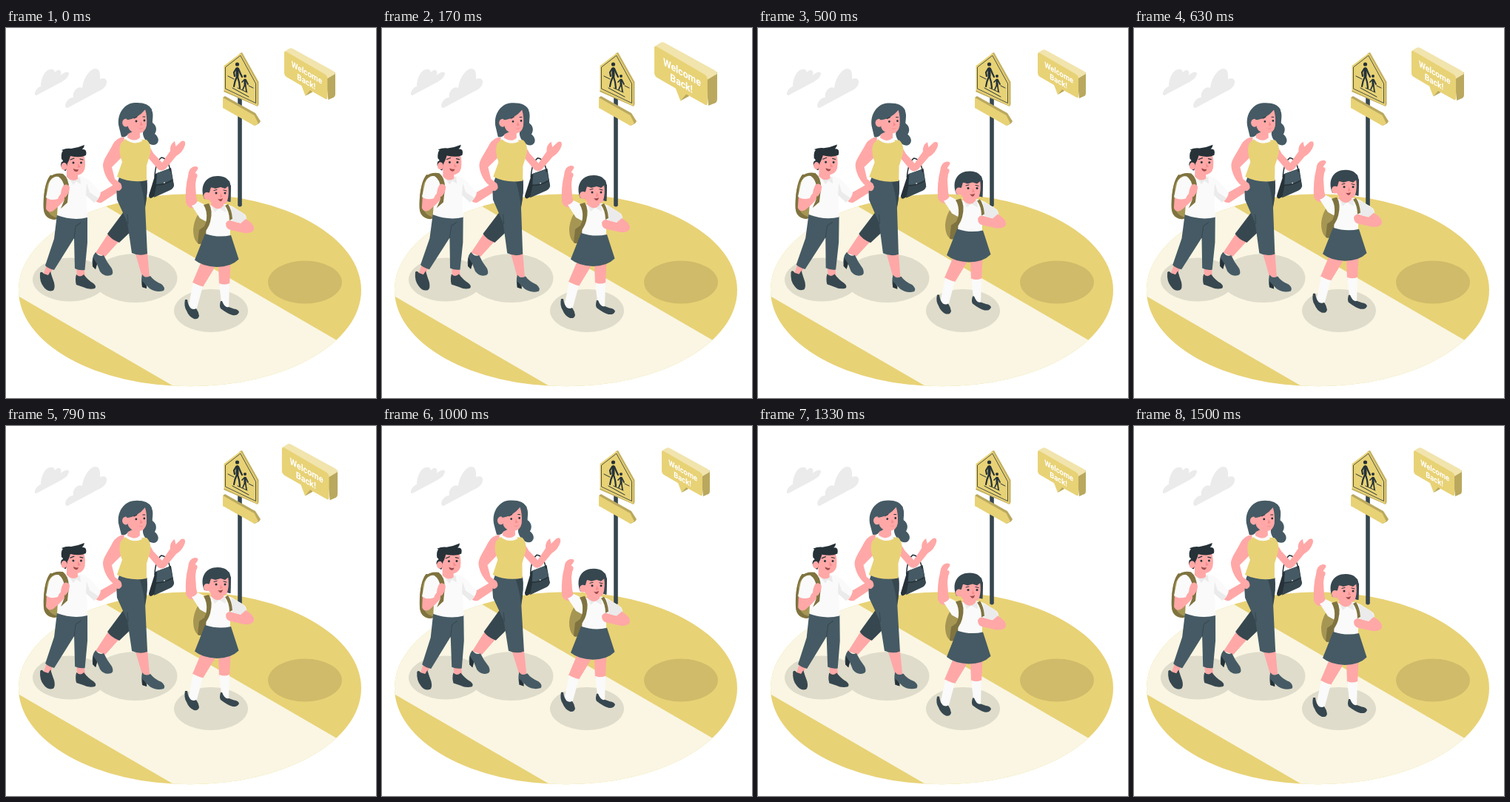
An HTML page that plays this animation: 500x500 px, repeating every 1540 ms.

```html
<!DOCTYPE html>
<html lang="en">
<head>
<meta charset="utf-8">
<title>Welcome back</title>
<style>
html, body { margin: 0; width: 100%; height: 100%; overflow: hidden; background: #fff; }
svg { display: block; width: 100%; height: 100%; }
.skin { fill: #ffa8a7; }
.blush { fill: #f58d8f; }
.white { fill: #fafafa; }
.fold { fill: #ebebeb; }
.slate { fill: #455a64; }
.dark { fill: #37474f; }
.ink { fill: #263238; }
.yellow { fill: #e8d276; }
.olive { fill: #7f7340; }
.tan { fill: #a59653; }
.line { fill: none; stroke: #263238; stroke-linecap: round; stroke-linejoin: round; }
.crease { fill: none; stroke: #37474f; stroke-linecap: round; }
text { font: 700 10.8px Roboto, sans-serif; fill: #fff; text-anchor: middle; }
</style>
</head>
<body>
<svg viewBox="0 0 500 500">
  <defs>
    <clipPath id="disc"><ellipse cx="248.5" cy="354.3" rx="231.5" ry="130"/></clipPath>
  </defs>

  <g id="clouds" fill="#ebebeb">
    <path d="M39 90C38 86 43 80 47 79C47 68 53 56 60 56Q65 55 66 60C71 54 76 57 74 64C79 59 85 58 85 62Q84 68 75 73L43 90Q40 92 39 90Z"/>
    <path d="M81 107C78 103 85 93 91 94C89 86 97 78 103 81C105 66 114 55 121 55Q128 55 127 69C134 66 137 70 136 75Q134 82 124 86L85 107Q82 109 81 107Z"/>
  </g>

  <g id="floor" clip-path="url(#disc)">
    <rect class="yellow" x="10" y="220" width="480" height="270"/>
    <path fill="#faf6e3" d="M135 241L447 422L400 500H254L17 362.500V241Z"/>
  </g>
  <g id="shadows" opacity=".1">
    <ellipse cx="86" cy="340" rx="50" ry="29.500"/>
    <ellipse cx="174.500" cy="338" rx="57" ry="33"/>
    <ellipse cx="277" cy="382" rx="50" ry="29"/>
    <ellipse cx="404" cy="343.500" rx="50" ry="29"/>
  </g>

  <g id="sign">
    <path class="dark" d="M313.200 88H318.800V240Q316 243 313.200 240Z"/>
    <path fill="#c4b163" d="M316 34L319 33L341.500 73V103L340 106L294 86Z"/>
    <path class="yellow" d="M317 34L294.500 51V84L339.500 105V74Z"/>
    <path class="line" stroke-width=".8" d="M316.500 37.500L296.500 53V82L337.500 101.500V75.500Z"/>
    <path class="line" stroke-width="1" d="M300 65L308 69M328 78L334 81M306 81L328 93M313 81L326 87"/>
    <circle class="ink" cx="312.500" cy="49" r="2.600"/>
    <path class="line" stroke-width="4" d="M312.500 55V65"/>
    <path class="line" stroke-width="2.200" d="M312 66L309.500 72L308 79M313 66L315 73L316 81M311 55L308 60L309 65M314 55L317 62L319 66"/>
    <circle class="ink" cx="323" cy="65" r="2"/>
    <path class="line" stroke-width="3" d="M323 70V76"/>
    <path class="line" stroke-width="1.700" d="M323 76L320 83M323.500 76L325 86M322 70L319 73M324 70L327 76"/>
    <path fill="#baa85e" d="M293 94L296 92L337 115L344 126L342 129L336 132Z"/>
    <path class="yellow" d="M293 94L335.500 118L341 129L335.500 132L293 108Z"/>
  </g>

  <g id="bubble">
    <path fill="#b9a85e" d="M431 66L443 60V88Q443 91 441 92L434 95Z"/>
    <path fill="#f1e4ad" d="M379 33L384 30Q386 28.500 389 30L440 58Q443 60 443 62L433 68Z"/>
    <path fill="#b9a85e" d="M405 90L414 85L411 80Z"/>
    <path class="yellow" d="M381 34L429 62Q433 64 433 68V92Q433 96 429 93L411 83L405 90L400 77L381 66Q378 64 378 61V35Q378 32 381 34Z"/>
    <text transform="matrix(.866 .5 0 1 406.600 64)">Welcome</text>
    <text transform="matrix(.866 .5 0 1 406 75.500)">Back!</text>
  </g>

  <g id="walkers">
    <g id="boy">
      <path class="tan" d="M60 199C54 206 50 225 51 245Q52 258 65 259L74 256V205Z"/>
      <path class="olive" d="M60 199C53 207 50 226 51 246Q53 258 66 259L72 257Q58 255 56 244L55 215Q57 206 66 200Z"/>
      <path class="skin" d="M55 320L64 323L59 335L50 334ZM95 322H105.500L107 337L96 336Z"/>
      <path class="dark" d="M46 331Q48 328 51 332L57 334L60 329Q62 336 65 344Q67 353 63 355Q56 357 51 350Q45 343 46 331ZM95 333Q100 338 105 333Q111 341 118 345Q123 349 120 352Q112 354 104 350L95 347Q93 340 95 333Z"/>
      <path class="slate" d="M69 252L110 255L110 290L106.500 327Q99 328 93 325L92 284L65 327Q57 325 53 321L65 285Z"/>
      <path class="crease" d="M92 284L94 269M94 268L101 263"/>
      <path class="skin" d="M121 226L142 214Q152 207 156 214Q157 221 149 223L129 236Q122 237 119 231Z"/>
      <path class="white" d="M75 201L100 200Q109 202 115 208L128 223Q126 232 119 236L109 227L110 256Q91 261 69 253L71 224Z"/>
      <path class="fold" d="M109 210L108 226L119 236Q123 234 125 230L113 222Z"/>
      <path class="skin" d="M55 226L70 229L76 222Q74 213 80 212Q86 214 85 222Q82 232 64 247Q57 251 54 244Z"/>
      <path class="white" d="M73 202Q62 199 58 210L54 229Q60 234 70 231L77 214Z"/>
      <path class="olive" d="M58 202Q66 195 77 197Q85 203 85 217L83 236L74 244L79 232V216Q78 206 71 201Q65 200 58 204Z"/>
      <path class="skin" d="M79 212Q83 210 86 215Q86 223 80 229L74 224Q75 215 79 212Z"/>
      <path class="fold" d="M82 199L91 212L95 207L101 211L100 202Z"/>
      <path class="skin" d="M82 192V201Q89 209 97 204V194Z"/>
      <path class="skin" d="M80 174L105 171Q108 179 106.500 190Q104 199 94 199Q81 198 80 185Z"/>
      <path class="ink" d="M81 193Q77 193 78 189Q72 188 75 181Q79 180 75 177Q74 169 77 166L75 165Q82 162 88 163Q97 162 106 158Q106 161 103 164Q110 163 108 172Q101 176 87 173Q85 180 83 183Z"/>
      <ellipse class="skin" cx="78.500" cy="187" rx="4" ry="5"/>
      <circle class="ink" cx="91" cy="182" r="1.500"/><circle class="ink" cx="101.500" cy="182" r="1.500"/>
      <path class="line" stroke-width="1.200" d="M87 178L92 176M100 177L104 178"/>
      <path class="blush" d="M97 183L101 188L97 189Z"/>
      <path fill="#9e4b4b" d="M91 190Q95 192 98 191Q97 195 94 194Q91 193 91 190Z"/>
    </g>

    <g id="mother">
      <path class="skin" d="M138 278L153 288L134 309L121 304ZM174 302L191 303L194 337L184 336Z"/>
      <path class="slate" d="M121 303Q126 310 132 307Q136 316 143 325Q146 332 142 334Q133 337 127 329L123 319L121 326L117 322Q115 310 121 303ZM184 333Q188 339 195 335Q200 342 210 346Q216 351 213 355Q203 358 194 352L188 346L190 352L184 350Q182 341 184 333Z"/>
      <path class="ink" d="M118 311L123 319L121 326L117 322ZM184 342L190 348V352L184 350Z"/>
      <path class="dark" d="M160 247L137 278Q141 285 153 290L177 267V240Z"/>
      <path class="slate" d="M154 199L190 204Q192 220 188 240L191 305Q181 309 170 304L164 263L150 232Q148 213 154 199Z"/>
      <path class="dark" d="M181 208L190.500 205Q192 222 188 243Q186 222 181 208Z"/>
      <path class="crease" d="M165 264L164 252"/>
      <path class="slate" d="M188 104C202 109 198 120 198 128C204 132 204 139 201 143C206 147 208 153 203 157C196 161 186 152 185 143Z"/>
      <path class="ink" d="M202 197L223 189L227 213L196 230Q193 230 193 226Z"/>
      <path class="dark" d="M204 209L224 198L227 213Q226 217 222 219L200 229Z"/>
      <path class="slate" d="M204 196L222 190L225 204Q214 212 203 211Z"/>
      <path class="line" stroke-width="1.500" d="M201 201Q202 181 210 175Q219 176 222 193M203 212Q214 212 224 206"/>
      <circle cx="214" cy="209" r="1" fill="#ccc"/>
      <path class="skin" d="M190 157Q195 161 199 169L211 182L222 166Q221 157 228 153L229.500 160L237 153Q243 151 242 158Q239 168 230 173L216 190Q209 196 203 188L191 174Z"/>
      <path class="skin" d="M160 147Q149 148 144 158C138 170 131 178 131 186C132 198 139 208 144 212Q147 221 153 220Q159 217 155 210L147 204L143 188L157 174Z"/>
      <path class="yellow" d="M161 150L190 151Q198 158 194 173L190 186V206Q169 210 150 201L157 181Q151 166 155 156Z"/>
      <path class="white" d="M164 146L161 150Q172 159 184 153L182 146Z"/>
      <path class="skin" d="M165 137L164 148Q174 155 181 148V137Z"/>
      <path class="slate" d="M153 135C148 116 161 101 174 101Q192 100 197 110Q198 123 191 130L165 143Q163 148 156 147Z"/>
      <path class="skin" d="M165 124Q178 121 188 110Q191 119 190 132Q188 142 179 142Q168 142 165 134Z"/>
      <ellipse class="skin" cx="162" cy="128" rx="4.800" ry="5.500"/>
      <path class="slate" d="M163 124Q178 123 188 110Q178 106 168 112Z"/>
      <circle class="ink" cx="176" cy="126" r="1.400"/><circle class="ink" cx="187" cy="125" r="1.400"/>
      <path class="line" stroke-width="1" d="M173 122L177 120M185 120L188 120"/>
      <path class="blush" d="M182 126L185 131L181 132ZM178 134Q182 137 186 134Q183 139 178 134Z"/>
    </g>
  </g>

  <g id="girl">
    <path class="tan" d="M269 242Q255 252 253 272Q253 289 262 292L278 278Z"/>
    <path class="olive" d="M261 273L274 264L276 278L265 291Q262 293 259 291Z"/>
    <path class="skin" d="M263 318L283 322L266 350L252 344ZM287 318H303.500L302 348H288Z"/>
    <path class="white" d="M253 344Q259 349 266 349L257 382L246 378ZM288 345Q295 348 302 345L301 379H292Z"/>
    <path class="dark" d="M242 367Q240 376 244 382Q247 390 254 393Q260 394 261 389Q260 383 257 379Q254 381 250 379Q246 375 245 367ZM290 369Q288 376 290 379Q299 386 306 388Q313 389 315 384Q314 380 308 379.500L301 377Q296 379 292 369Z"/>
    <path class="skin" d="M243 236Q242 215 246 200Q247 188 255 187Q261 187 259 191L255.500 196Q261 197 257 204L256 212L257 228L260 242Q247 247 243 236Z"/>
    <path class="white" d="M251 240Q256 239 259 234L271 240L297 238Q305 240 309 243L323 252Q327 258 324 265L303 262L303 284L270 283L271 262L262 257Z"/>
    <path class="fold" d="M304 241L319 249Q328 257 324 265L306 261Z"/>
    <path class="skin" d="M324 258Q336 265 335 272Q333 278 322 277L304 273Q297 272 297 264Q300 258 306 261L317 264Z"/>
    <path class="slate" d="M269 278Q287 284 304 280L314.500 312.500Q304 323 285 323Q265 322 255 313.500Z"/>
    <path class="olive" d="M267 239L274 237Q280 246 276 262Q273 273 264 280L262 276Q270 268 271 258Q272 247 267 239ZM296 240L300 238Q305 245 306 258L302 260Q302 248 296 240Z"/>
    <path class="fold" d="M276 236L282 249L288 244L297 249L296 238Z"/>
    <path class="skin" d="M277 231V239Q286 249 294 240V233Z"/>
    <path class="dark" d="M268 231C261 213 270 200 286 200Q302 200 304 215L303 235L292 232Z"/>
    <path class="skin" d="M274 216L301 212Q303 227 299 235Q293 240 285 238Q275 237 273 229Z"/>
    <path class="dark" d="M270 225L275 222L277 215L283 217L290 215L296 217L301 213L304 216L302 207Q292 200 277 204Q266 211 270 225Z"/>
    <path class="dark" d="M300 212L304 213L303.500 235L299 234Q302 224 300 212Z"/>
    <ellipse class="skin" cx="271.500" cy="227" rx="4.500" ry="5"/>
    <circle class="ink" cx="284" cy="223" r="1.500"/><circle class="ink" cx="296" cy="223" r="1.500"/>
    <path class="line" stroke-width="1" d="M281 219.500L285 218.500M294 219L298 220"/>
    <path class="blush" d="M290 223L293 228L289 229Z"/>
    <path fill="#9e4b4b" d="M286 231Q290 232 293 230Q292 235 289 234Z"/>
  </g>
</svg>
<script>
const LOOP = 1540;
// [time, scale] of the double heartbeat
const BEAT = [[0, 1.06], [168, 1.31], [378, 1], [585, 1], [630, 1.09], [700, 1.29], [900, 1], [1500, 1], [LOOP, 1.06]];
const walkers = document.getElementById('walkers');
const girl = document.getElementById('girl');
const bubble = document.getElementById('bubble');

function beatScale(t) {
  const i = BEAT.findIndex(([time]) => time > t);
  const [t0, s0] = BEAT[i - 1], [t1, s1] = BEAT[i];
  return s0 + (s1 - s0) * (t - t0) / (t1 - t0);
}

function draw() {
  const t = performance.now() % LOOP;
  const phase = 2 * Math.PI * t / LOOP;
  walkers.setAttribute('transform', `rotate(${0.9 * Math.sin(phase)} 143 228)`);
  girl.setAttribute('transform', `translate(0 ${-4.5 * (1 - Math.cos(phase))})`);
  bubble.setAttribute('transform', `translate(410.5 62) scale(${beatScale(t)}) translate(-410.5 -62)`);
  requestAnimationFrame(draw);
}
draw();
</script>
</body>
</html>
```
